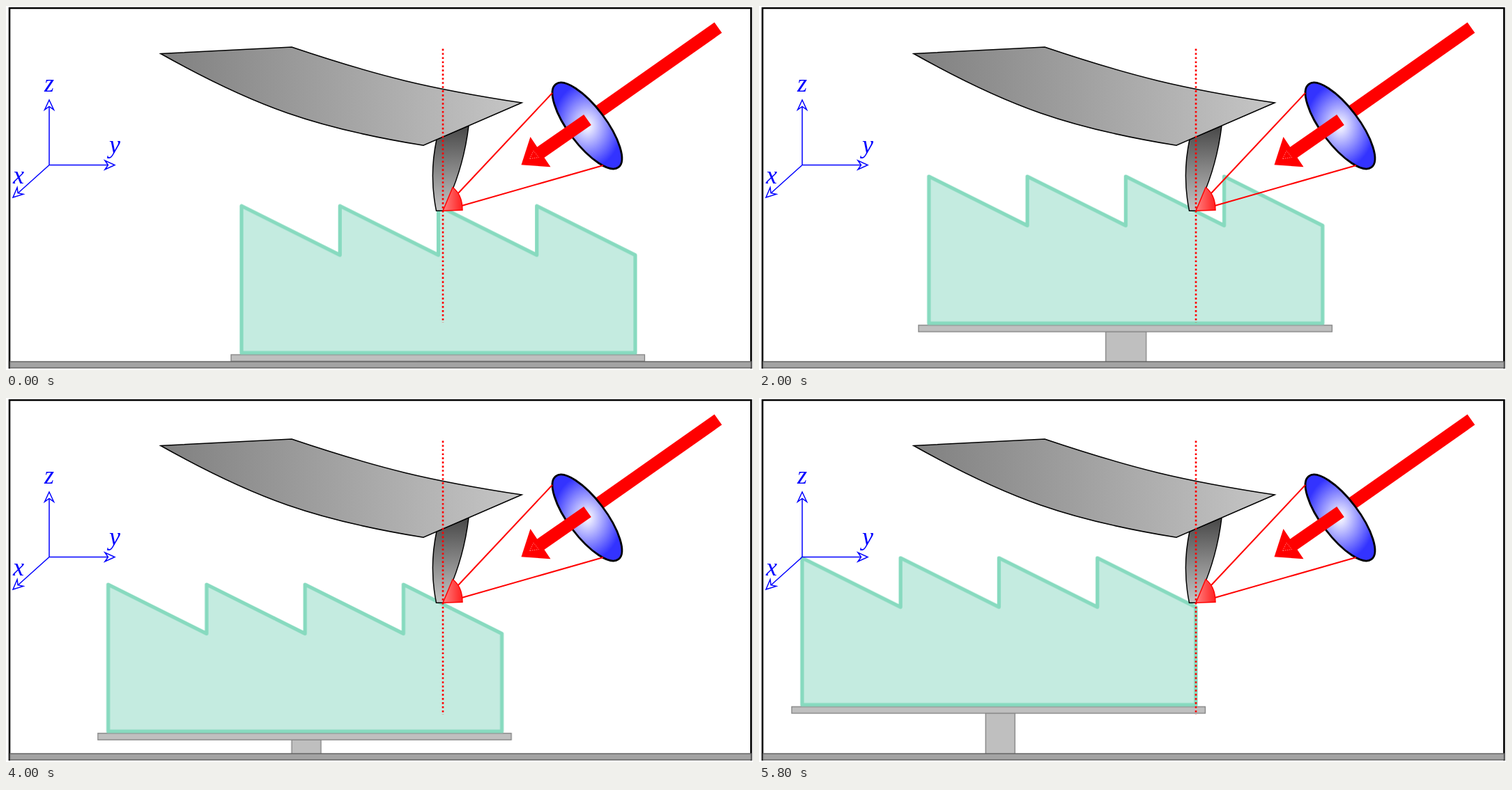
Write an HTML page that moves like this. It is 1072 by 523 pixels and loops after 6000 ms.

```html
<!DOCTYPE html>
<html lang="en">
<head>
<meta charset="utf-8">
<title>Probe scanning a sawtooth surface</title>
<style>
  html, body { margin: 0; width: 100%; height: 100%; overflow: hidden; background: #fff; }
  svg { display: block; width: 100vw; height: 100vh; }

  /* One tooth pitch in fifteen hard steps, twice per loop. */
  .scan { animation: scan 3s steps(15, end) infinite; }
  .pass { animation: pass 6s step-end infinite; }
  .post { x: 253.8px; width: 58px; animation: post 6s step-end infinite; }

  @keyframes scan { to { transform: translate(-141.3px, -63.6px); } }
  @keyframes pass {
    0% { transform: translate(338px, 287.2px); }
    50% { transform: translate(193.7px, 289.1px); }
  }
  @keyframes post {
    0% { x: 253.8px; width: 58px; }
    50% { x: 263.4px; width: 42px; }
  }

  .thin { stroke: #000; stroke-width: 1.5; }
  .stage { fill: #bfbfbf; stroke: #808080; stroke-width: 1.3; }
  .sample { fill: #c4ebe0; stroke: #87dabf; stroke-width: 5.2; stroke-linejoin: round; }
  .beam { fill: none; stroke: #f00; }
  .axes { fill: none; stroke: #00f; stroke-width: 1.5; }
  .labels { fill: #00f; font: italic 36px "Liberation Serif", "Times New Roman", serif; text-anchor: middle; }
</style>
</head>
<body>
<svg viewBox="0 0 1072 523" preserveAspectRatio="none">
  <defs>
    <linearGradient id="lever"><stop stop-color="#808080"/><stop offset="1" stop-color="#c6c6c6"/></linearGradient>
    <linearGradient id="tip" x2="0" y2="1"><stop stop-color="#474747"/><stop offset="1" stop-color="#c4c4c4"/></linearGradient>
    <linearGradient id="spot"><stop stop-color="#ff8080"/><stop offset="1" stop-color="#ff2020"/></linearGradient>
    <radialGradient id="glass"><stop stop-color="#fff"/><stop offset="1" stop-color="#3333ff"/></radialGradient>
    <clipPath id="above"><path d="M0 0H1072V515H0Z"/></clipPath>
    <path id="head" d="M0 0L-14 6.5L-9.5 0L-14 -6.5Z" fill="#fff"/>
  </defs>

  <path d="M5 521V3H1069.3V521" fill="none" stroke="#000" stroke-width="2.6"/>

  <g clip-path="url(#above)">
    <g class="scan"><g class="pass">
      <rect class="stage post" y="223" height="90"/>
      <rect class="stage" x="-15" y="213.8" width="593.5" height="9.4"/>
      <path class="sample" d="M0 0l141.25 70.6v-70.6l141.25 70.6v-70.6l141.25 70.6v-70.6l141.25 70.6V211H0Z"/>
    </g></g>
  </g>
  <rect x="5.7" y="511" width="1063.5" height="9" fill="#a3a3a3" stroke="#606060" stroke-width="1.4"/>

  <g class="axes">
    <path d="M62 219V228.5H147M62 229V144M62 228.5L17 269"/>
    <use href="#head" transform="translate(62 135) rotate(-90)"/>
    <use href="#head" transform="translate(156 228.5)"/>
    <use href="#head" transform="translate(10 275) rotate(138)"/>
  </g>
  <g class="labels">
    <text x="62" y="123">z</text>
    <text x="156" y="211">y</text>
    <text x="18" y="255">x</text>
  </g>

  <path class="thin" fill="url(#tip)" d="M618 191.5Q607 243 617.5 294.3H627Q656 238 664 172Z"/>
  <path class="thin" fill="url(#lever)" d="M222 68.5L410 59C536 101.4 608.5 119 740 139L599 200.3C445 175.3 358 145 222 68.5Z"/>

  <path class="beam" stroke-width="18.5" d="M1022 31L846 155"/>
  <path fill="url(#glass)" stroke="#000" stroke-width="2.8" d="M789 112.3A74.7 26.9 53 1 1 879 231.7A74.7 26.9 53 1 1 789 112.3Z"/>
  <path class="beam" stroke-width="18.5" d="M834.5 163.5L762 214"/>
  <path fill="#f00" d="M739.5 228.3L752.5 188L781.5 231.3Z"/>
  <path fill="none" stroke="#ff9090" stroke-width=".9" stroke-dasharray="1.5 1.5" d="M751.5 219.5L757 208L764.5 217.5Z"/>

  <path class="beam" stroke-width="2" d="M784 125L648 270M857 229L654 287"/>
  <path fill="url(#spot)" stroke="#f00" stroke-width="1.4" d="M627 294.3L641 260.5Q655 271 655 293.3Z"/>
  <path class="beam" stroke-width="2.65" stroke-dasharray="2.65 3.31" d="M627 61.5V455"/>
</svg>
</body>
</html>
```
